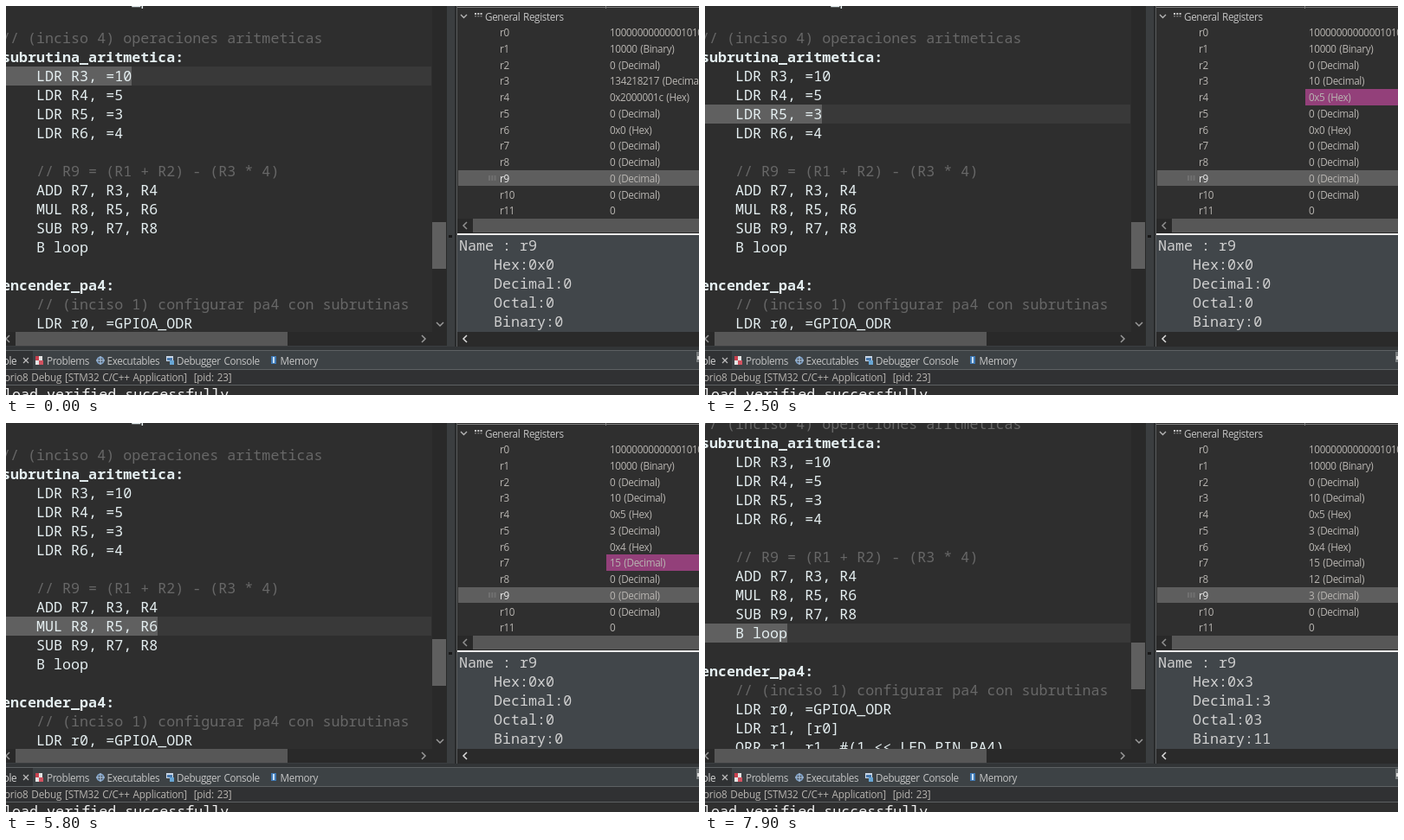
Write an HTML page with a canvas that moves like this. It is 800x450 px and loops after 8000 ms.

```html
<!DOCTYPE html>
<html lang="es">
<head>
<meta charset="utf-8">
<style>
html, body { margin: 0; width: 100%; height: 100%; overflow: hidden; background: #2f2f2f; }
canvas { display: block; width: 800px; height: 450px; }
</style>
</head>
<body>
<canvas id="stage" width="800" height="450"></canvas>
<script>
const ctx = document.getElementById('stage').getContext('2d');
const LOOP = 8000;
const MONO = '"Noto Sans Mono", "DejaVu Sans Mono", monospace';
const SANS = '"Open Sans", "Noto Sans", sans-serif';
const INK = '#e4eef0', DIM = '#676767', SOFT = '#c4c4c4', VALUE = '#b8b5b1';

const code = [
  '    BL encender_pa4',
  '',
  '// (inciso 4) operaciones aritmeticas',
  'subrutina_aritmetica:',
  '    LDR R3, =10',
  '    LDR R4, =5',
  '    LDR R5, =3',
  '    LDR R6, =4',
  '',
  '    // R9 = (R1 + R2) - (R3 * 4)',
  '    ADD R7, R3, R4',
  '    MUL R8, R5, R6',
  '    SUB R9, R7, R8',
  '    B loop',
  '',
  'encender_pa4:',
  '    // (inciso 1) configurar pa4 con subrutinas',
  '    LDR r0, =GPIOA_ODR',
  '    LDR r1, [r0]',
  '    ORR r1, r1, #(1 << LED_PIN_PA4)'
];

const initial = ['1000000000000101000', '10000 (Binary)', '0 (Decimal)',
  '134218217 (Decimal)', '0x2000001c (Hex)', '0 (Decimal)', '0x0 (Hex)',
  '0 (Decimal)', '0 (Decimal)', '0 (Decimal)', '0 (Decimal)', '0'];

// at: cursor moves, then the register view refreshes at "show"
const steps = [
  { at: 800, show: 1000, line: 5, reg: 3, value: '10 (Decimal)' },
  { at: 1800, show: 2000, line: 6, reg: 4, value: '0x5 (Hex)' },
  { at: 2700, show: 2800, line: 7, reg: 5, value: '3 (Decimal)' },
  { at: 3500, show: 3600, line: 10, reg: 6, value: '0x4 (Hex)' },
  { at: 4900, show: 5000, line: 11, reg: 7, value: '15 (Decimal)' },
  { at: 6300, show: 6400, line: 12, reg: 8, value: '12 (Decimal)' },
  { at: 7700, show: 7800, line: 13, reg: 9, value: '3 (Decimal)' }
];

function stateAt(t) {
  const s = { line: 4, regs: initial.slice(), changed: -1, scroll: 0 };
  for (const step of steps) {
    if (t >= step.at) {
      s.line = step.line;
      s.changed = -1;
    }
    if (t >= step.show) {
      s.regs[step.reg] = step.value;
      s.changed = step.reg;
    }
  }
  if (s.line === 13) s.scroll = 36;
  return s;
}

function box(x, y, w, h, color) {
  ctx.fillStyle = color;
  ctx.fillRect(x, y, w, h);
}

function mono(str, x, y, color, bold) {
  ctx.font = (bold ? 'bold ' : '') + '16.7px ' + MONO;
  ctx.letterSpacing = '0px';
  ctx.wordSpacing = '0px';
  ctx.fillStyle = color;
  ctx.fillText(str, x, y);
}

function label(str, x, y, color, size = 11.7, gap = -0.35) {
  ctx.font = size + 'px ' + SANS;
  ctx.letterSpacing = gap + 'px';
  ctx.wordSpacing = '1px';
  ctx.fillStyle = color;
  ctx.fillText(str, x, y);
}

function line(color, width, ...pts) {
  ctx.strokeStyle = color;
  ctx.lineWidth = width;
  ctx.beginPath();
  for (let i = 0; i < pts.length; i += 2) ctx.lineTo(pts[i], pts[i + 1]);
  ctx.stroke();
}

function clip(x, y, w, h, draw) {
  ctx.save();
  ctx.beginPath();
  ctx.rect(x, y, w, h);
  ctx.clip();
  draw();
  ctx.restore();
}

const leftArrow = (x, y, c) => line(c, 1.5, x + 2, y - 4, x - 2, y, x + 2, y + 4);

function drawCode(s) {
  box(0, 0, 492, 378, '#2e2e2e');
  clip(0, 0, 492, 377, () => {
    const rowTop = i => i * 22 - 18 - s.scroll;
    const y = rowTop(s.line);
    box(0, y, 491, 22, '#393939');
    box(0, y, code[s.line].length * 10 - 5, 22, '#606060');
    code.forEach((str, i) => {
      const color = str.includes('//') ? DIM : INK;
      mono(str, -5, rowTop(i) + 17, color, str.endsWith(':'));
    });
  });
  box(492, 0, 17, 378, '#292929');
  box(492, s.scroll ? 254 : 250, 16, 54, '#5f5f5f');
  line('#9a9a9a', 1.5, 497, 366, 501, 370, 505, 366);
  box(0, 377, 509, 16, '#292929');
  box(11, 377, 314, 16, '#575757');
  leftArrow(2, 385, '#999');
  line('#999', 1.5, 480, 381, 484, 385, 480, 389);
}

function drawRegisters(s) {
  box(521, 0, 279, 246, '#2f2f2f');
  box(521, 1, 279, 1, '#808080');
  box(692, 0, 1, 3, '#808080');
  line('#b5b5b5', 1.4, 525, 10, 528.5, 13.5, 532, 10);
  for (let i = 0; i < 3; i++) {
    box(541 + i * 3.3, 8, 2, 2, '#c8c8c8');
    box(541 + i * 3.3, 11, 2, 1.5, '#777');
  }
  label('General Registers', 553, 17, SOFT);
  s.regs.forEach((value, i) => {
    const mid = 31 + i * 18.73, picked = i === 9;
    if (picked) {
      box(522, 190, 278, 18, '#5e5e5e');
      for (let k = 0; k < 3; k++) box(557 + k * 3.3, 196, 2, 6, '#707070');
    } else if (i === s.changed) {
      box(693, Math.round(mid - 10), 107, 19, '#93407a');
    }
    label('r' + i, 570, mid + 4.3, picked ? '#eee' : VALUE);
    label(value, 697, mid + 4.3, VALUE);
  });
  box(521, 246, 279, 17, '#292929');
  box(539, 246, 261, 16, '#575757');
  leftArrow(530, 254, '#909090');
}

function drawDetails(s) {
  box(521, 263, 279, 2, '#eeeeee');
  box(521, 265, 279, 113, '#41464a');
  const n = parseInt(s.regs[9], 10);
  const rows = ['Name : r9', '    Hex:0x' + n.toString(16), '    Decimal:' + n,
    '    Octal:' + (n ? '0' : '') + n.toString(8), '    Binary:' + n.toString(2)];
  rows.forEach((str, i) => mono(str, 523, 283 + i * 22, '#d0d0d0'));
  box(521, 377, 279, 17, '#2a2a2a');
  leftArrow(530, 385, '#ddd');
}

function drawTabs() {
  box(0, 394, 800, 4, '#323537');
  box(0, 398, 800, 22, '#3d4245');
  box(0, 398, 800, 1, '#5d6163');
  box(0, 399, 31, 21, '#303234');
  label('Console', -29, 414.5, '#d4d4d4');
  line('#bbb', 1.2, 20, 407, 26, 413);
  line('#bbb', 1.2, 26, 407, 20, 413);

  box(34, 405, 8, 10, '#e4e4e4');
  box(34, 405, 4, 5, '#c9414f');
  box(38, 410, 5, 5, '#d05260');
  label('Problems', 47, 414.5, SOFT);

  ctx.strokeStyle = '#7e9fc5';
  ctx.lineWidth = 2;
  ctx.beginPath();
  ctx.arc(109, 410, 3.6, 0, 7);
  ctx.stroke();
  line('#a9c2dd', 1.2, 104, 410, 114, 410);
  line('#a9c2dd', 1.2, 109, 405, 109, 415);
  label('Executables', 116.5, 414.5, SOFT);

  box(185, 405, 8, 6, '#cad8e8');
  box(186, 407, 6, 3, '#4778ad');
  box(189, 410, 5, 5, '#68a6d4');
  label('Debugger Console', 197, 414.5, SOFT);

  box(306, 405, 6, 9, '#3f79b5');
  box(308, 406, 2, 7, '#c9dff3');
  label('Memory', 316.5, 414.5, SOFT);
  box(797, 400, 3, 12, '#777b7d');
  box(798, 405, 2, 4, '#ddd');
}

function drawConsole() {
  box(0, 420, 800, 18, '#303133');
  box(0, 420, 800, 1, '#5d6163');
  label('orio8 Debug [STM32 C/C++ Application]  [pid: 23]', -2, 433.5, VALUE, 11.7, -0.2);
  box(0, 438, 800, 12, '#2f2f2f');
  box(0, 438, 800, 1, '#5d6163');
  mono('Download verified successfully', -43, 455, '#f2f2f2');
}

function render(t) {
  const s = stateAt(t);
  box(0, 0, 800, 450, '#3b3e40');
  box(518, 0, 2, 394, '#292b2c');
  box(520, 0, 1, 394, '#5a5c5d');
  drawCode(s);
  box(511, 265, 4, 3, '#191919');
  drawRegisters(s);
  drawDetails(s);
  drawTabs();
  drawConsole();
}

const start = performance.now();
function tick() {
  render((performance.now() - start) % LOOP);
  requestAnimationFrame(tick);
}
tick();
</script>
</body>
</html>
```
